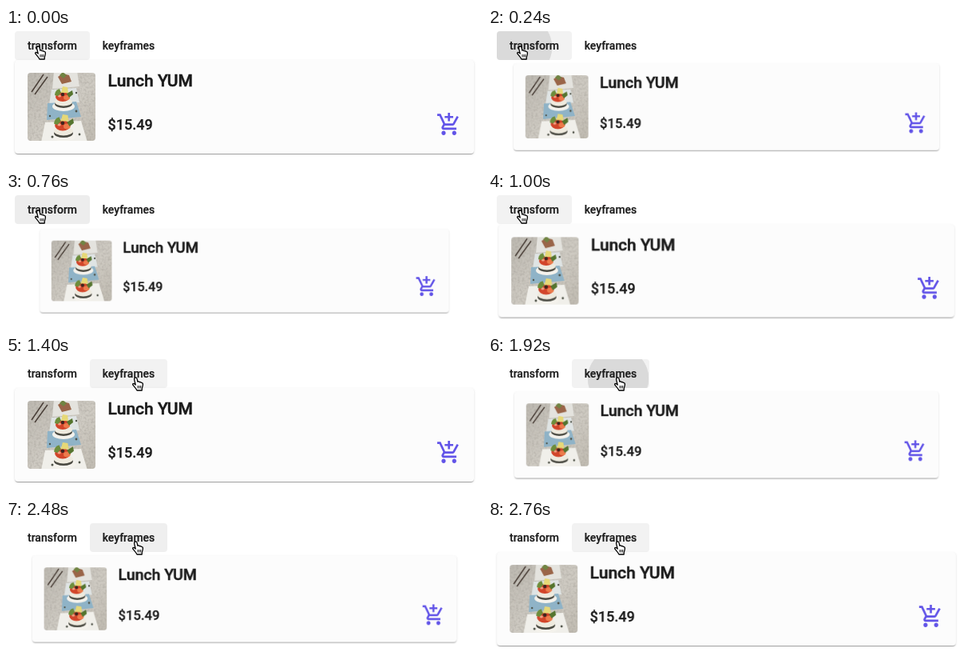
An HTML page that plays this animation: 596 by 170 pixels, repeating every 2800 ms.

```html
<!DOCTYPE html>
<html lang="en">
<head>
<meta charset="utf-8">
<title>Card pulse</title>
<style>
  html, body { margin: 0; width: 100%; height: 100%; overflow: hidden; background: #fff; }
  body { position: relative; font-family: Roboto, sans-serif; font-weight: 500; color: #1b1b1b; }
  .tab {
    position: absolute; top: 4px; height: 36px; overflow: hidden; border-radius: 4px;
    font-size: 14px; line-height: 36px; text-align: center;
  }
  .tab span { position: relative; -webkit-text-stroke: .2px; }
  #tabA { left: 11px; width: 94px; }
  #tabB { left: 105px; width: 97px; }
  .ripple { position: absolute; border-radius: 50%; background: #000; opacity: 0; }
  #rippleA { left: -37px; top: -47px; width: 134px; height: 134px; }
  #rippleB { left: -6px; top: -40px; width: 128px; height: 128px; }
  #card {
    position: absolute; left: 11px; top: 40px; width: 575px; height: 117px;
    border-radius: 4px; background: #fcfcfc;
    box-shadow: 0 2px 1px -1px rgba(0,0,0,.2), 0 1px 1px rgba(0,0,0,.14), 0 1px 3px rgba(0,0,0,.12);
  }
  svg { display: block; }
  #cursor { position: absolute; left: 35px; top: 22px; overflow: visible; }
</style>
</head>
<body>
<div class="tab" id="tabA"><i class="ripple" id="rippleA"></i><span>transform</span></div>
<div class="tab" id="tabB"><i class="ripple" id="rippleB"></i><span>keyframes</span></div>

<div id="card">
  <svg width="575" height="117" viewBox="0 0 575 117">
    <defs>
      <clipPath id="frame"><rect width="85" height="85" rx="4"/></clipPath>
      <linearGradient id="stone" x2="1" y2="1">
        <stop offset="0" stop-color="#bdb9b1"/>
        <stop offset=".55" stop-color="#cfcbc3"/>
        <stop offset="1" stop-color="#c1bcb2"/>
      </linearGradient>
      <filter id="grain" x="0" y="0" width="1" height="1">
        <feTurbulence type="fractalNoise" baseFrequency=".35" numOctaves="2" seed="4"/>
        <feColorMatrix values="0 0 0 0 .3  0 0 0 0 .28  0 0 0 0 .25  1.6 0 0 0 -.65"/>
      </filter>
      <filter id="soft"><feGaussianBlur stdDeviation=".45"/></filter>
      <g id="bite">
        <ellipse cy="12" rx="14" ry="6" fill="#f4f2ec"/>
        <ellipse cy="9" rx="11" ry="5" fill="#4a4a42"/>
        <ellipse cy="6.5" rx="11" ry="5" fill="#eeeade"/>
        <ellipse cx="-1" rx="9" ry="6" fill="#d2452a"/>
        <ellipse cx="4" cy="1" rx="4" ry="3" fill="#ec7b4b"/>
        <ellipse cx="-5" cy="-1" rx="2" ry="1.5" fill="#f0a184"/>
        <path d="M-11-2q0-6 6-8l2 5-4 4z" fill="#6d8d3b"/>
        <path d="M4-4l7-4 1 5-5 4z" fill="#55752f"/>
        <path d="M-3-5l2-8 6 1 1 7z" fill="#e6d877"/>
        <circle cx="-1" cy="-3" r="2.2" fill="#40251f"/>
      </g>
    </defs>
    <g transform="translate(16 16)" clip-path="url(#frame)">
      <rect width="85" height="85" fill="url(#stone)"/>
      <rect width="85" height="85" filter="url(#grain)" opacity=".5"/>
      <g filter="url(#soft)">
        <path d="M33-2h29l3 19-34 3z" fill="#e4e3de"/>
        <path d="M38 5l6-4 8 2 3 8-12 3z" fill="#9a6549"/>
        <path d="M40 3l4-4 5 4-4 4z" fill="#718443"/>
        <path d="M30 21l31-2 4 18-38 3z" fill="#dfe4e4"/>
        <path d="M25 38l36-2 6 19-43 4z" fill="#8fb3c7"/>
        <path d="M22 62l45-2 8 27H17z" fill="#f0efea"/>
        <path d="M20 2L5 24M25 5L9 27" fill="none" stroke="#4b4039" stroke-width="1.5"/>
        <use href="#bite" x="45" y="30"/>
        <use href="#bite" transform="translate(45 66) scale(1.08)"/>
        <g fill="#4f5349">
          <circle cx="61" cy="48" r="1.4"/><circle cx="28" cy="54" r="1.2"/>
          <circle cx="31" cy="80" r="1.5"/><circle cx="65" cy="77" r="1.4"/>
          <circle cx="61" cy="25" r="1.2"/>
        </g>
      </g>
    </g>
    <g fill="#1b1b1b" stroke="#1b1b1b">
      <text x="116.5" y="33" font-size="21" stroke-width=".5">Lunch YUM</text>
      <text x="116.5" y="87" font-size="18" stroke-width=".25">$15.49</text>
    </g>
    <path fill="#6254e8" transform="translate(527.6 64.6) scale(1.3333)" d="M11 9h2V6h3V4h-3V1h-2v3H8v2h3v3zm-4 9c-1.1 0-1.99.9-1.99 2S5.9 22 7 22s2-.9 2-2-.9-2-2-2zm10 0c-1.1 0-1.99.9-1.99 2s.89 2 1.99 2 2-.9 2-2-.9-2-2-2zm-9.83-3.25l.03-.12.9-1.63h7.45c.75 0 1.41-.41 1.75-1.03l3.86-7.01L19.42 4h-.01l-1.1 2-2.76 5H8.53l-.13-.27L6.16 6l-.95-2-.94-2H1v2h2l3.6 7.59-1.35 2.45c-.16.28-.25.61-.25.96 0 1.1.9 2 2 2h12v-2H7.42c-.13 0-.25-.11-.25-.25z"/>
  </svg>
</div>

<svg id="cursor" width="16" height="18" viewBox="0 0 16 18">
  <path fill="#fff" stroke="#000" stroke-width="1.3" stroke-linejoin="round" d="M5 1C6.3.8 6.9 1.8 7.1 2.7L7.8 6C8.7 5.5 9.7 5.8 10.1 6.7 11 6.2 12.1 6.6 12.4 7.4 13.4 7.2 14.3 7.9 14.4 9 14.5 11.5 13.7 13 13.3 14.2L13.2 17H7C6 14.8 4 12.6 2 10.3 1.1 9 2.2 8 3.4 8.6L5.2 10 3.7 3.8C3.4 2.4 3.8 1.2 5 1Z"/>
  <path fill="none" stroke="#000" stroke-width=".9" d="M8 11v3.5M9.9 11v3.5M11.7 11v3.5"/>
</svg>

<script>
  const LOOP = 2800;
  const TAP_A = 126, TAP_B = 1802, CROSS = 1360;
  const HOVER = '#f2f2f2', PLAIN = '#ffffff';
  const RIPPLE_EASE = 'cubic-bezier(0,0,.2,1)';
  const $ = id => document.getElementById(id);

  // Each step: [time in ms, properties, easing towards the next step]
  const play = (id, steps) => $(id).animate(
    steps.map(([ms, props, easing = 'linear']) => ({ ...props, offset: ms / LOOP, easing })),
    { duration: LOOP, iterations: Infinity });

  const scale = s => ({ transform: `scale(${s})` });
  const pulse = at => [
    [at, scale(1), 'ease'],
    [at + 500, scale(.8), 'ease'],
    [Math.min(at + 1000, LOOP), scale(1)]
  ];
  play('card', [[0, scale(1)], ...pulse(TAP_A), ...pulse(TAP_B)]);

  const blob = (s, opacity) => ({ ...scale(s), opacity });
  const ripple = (id, at) => play(id, [
    [0, blob(0, 0)],
    [at, blob(0, 0)],
    [at, blob(0, .07), RIPPLE_EASE],
    [at + 450, blob(1, .12), RIPPLE_EASE],
    [at + 850, blob(1, 0)],
    [LOOP, blob(1, 0)]
  ]);
  ripple('rippleA', TAP_A);
  ripple('rippleB', TAP_B);

  const hover = (id, before, after) => play(id, [
    [0, { backgroundColor: before }, 'step-end'],
    [CROSS, { backgroundColor: after }],
    [LOOP, { backgroundColor: after }]
  ]);
  hover('tabA', HOVER, PLAIN);
  hover('tabB', PLAIN, HOVER);

  const move = (x, y) => ({ transform: `translate(${x}px, ${y}px)` });
  play('cursor', [
    [0, move(0, 0)],
    [1130, move(0, 0), 'ease-in-out'],
    [1200, move(6, 0)],
    [1300, move(6, 0), 'ease-in-out'],
    [1400, move(122, 4)],
    [LOOP, move(122, 4)]
  ]);
</script>
</body>
</html>
```
